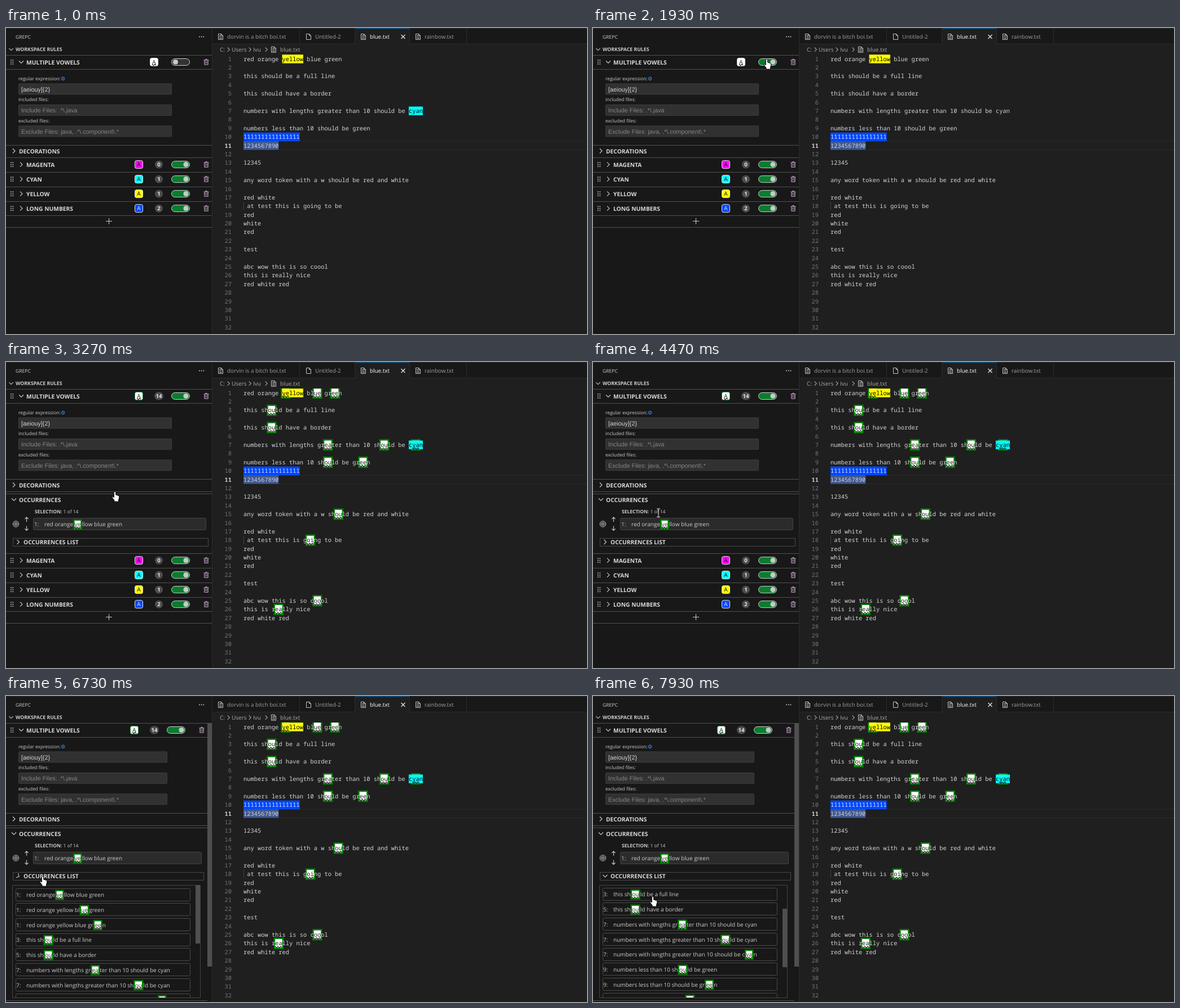
An HTML page with a canvas for the animation above (8 s loop, 1030 by 544 pixels).

```html
<!DOCTYPE html>
<html lang="en">
<head>
<meta charset="utf-8">
<title>Rule highlighter</title>
<style>
html, body { margin: 0; width: 100%; height: 100%; overflow: hidden; background: #1f1f1f; }
canvas { display: block; width: 1030px; height: 544px; }
</style>
</head>
<body>
<canvas id="stage" width="1030" height="544"></canvas>
<script>
const ctx = document.getElementById('stage').getContext('2d');
ctx.textRendering = 'geometricPrecision';

const LOOP = 8000, FPS = 15;
const UI = '"Open Sans", "Noto Sans", sans-serif';
const MONO = '"Noto Sans Mono", "DejaVu Sans Mono", monospace';
const ARIAL = '"Liberation Sans", Arial, sans-serif';
const FG = '#cccccc', RULE = '#505050', GREEN = '#008000';
const CODE_X = 421, CHAR_W = 6.235, LINE_H = 15.39, EDGE = 2.43;

const code = [
  'red orange yellow blue green', '', 'this should be a full line', '',
  'this should have a border', '',
  'numbers with lengths greater than 10 should be cyan', '',
  'numbers less than 10 should be green', '1111111111111111', '1234567890', '',
  '12345', '', 'any word token with a w should be red and white', '',
  'red white', ' at test this is going to be', 'red', 'white', 'red', '',
  'test', '', 'abc wow this is so coool', 'this is really nice', 'red white red'
];

// Every pair of vowels: line index, column, text
const hits = code.flatMap((text, line) =>
  [...text.matchAll(/[aeiouy]{2}/g)].map(m => ({ line, col: m.index, text })));

const words = [
  { line: 0, word: 'yellow', fill: '#ffff00', ink: '#000' },
  { line: 6, word: 'cyan', fill: '#00ffff', ink: '#000' },
  { line: 9, word: code[9], fill: '#0048ff', ink: '#dfe6ff' },
  { line: 10, word: code[10], fill: '#41588c', ink: '#cfd4e0' }
];

const rules = [
  ['MAGENTA', '#ff00ff', '#000', '0'], ['CYAN', '#00ffff', '#000', '1'],
  ['YELLOW', '#ffff00', '#000', '1'], ['LONG NUMBERS', '#0048ff', '#dfe6ff', '2']
];

// Pointer path: step, x, y
const path = [
  [0, 1060, 530], [2, 1060, 530], [3, 1024, 530], [4, 640, 300], [5, 245, 67],
  [8, 245, 67], [11, 262, 69], [14, 316, 60], [16, 308, 55], [30, 308, 55],
  [33, 400, 100], [37, 523, 157], [43, 523, 157], [46, 330, 190], [49, 193, 230],
  [51, 160, 234], [55, 123, 229], [56, 123, 229], [59, 121, 222], [60, 121, 222],
  [62, 118, 216], [67, 116, 268], [75, 116, 268], [76, 117, 262], [82, 65, 320],
  [107, 65, 320], [109, 101, 365], [110, 106, 356]
];
const hand = new Path2D('M-1.7 1.6Q0-1.2 1.7 1.6V6L6.6 7.6Q8 8.3 7.8 11L6.6 15V18.2H-1V16L-4.8 11Q-5.4 9-3.5 9.2L-1.7 11Z');

const clamp = v => Math.max(0, Math.min(1, v));
const ease = v => (v = clamp(v), v * v * (3 - 2 * v));

function rect(x, y, w, h, color) {
  ctx.fillStyle = color;
  ctx.fillRect(x, y, w, h);
}

function box(x, y, w, h, r, fill, stroke) {
  ctx.beginPath();
  ctx.roundRect(x + .5, y + .5, w - 1, h - 1, r);
  if (fill) { ctx.fillStyle = fill; ctx.fill(); }
  if (stroke) { ctx.strokeStyle = stroke; ctx.lineWidth = 1; ctx.stroke(); }
}

function clipTo(x, y, w, h, paint) {
  ctx.save();
  ctx.beginPath();
  ctx.rect(x, y, w, h);
  ctx.clip();
  paint();
  ctx.restore();
}

function disc(x, y, r, fill) {
  ctx.beginPath();
  ctx.arc(x, y, r, 0, 7);
  ctx.fillStyle = fill;
  ctx.fill();
}

// Text centred vertically on y; returns its width
function text(s, x, y, size, color = FG, opt = {}) {
  ctx.font = `${opt.bold ? 'bold ' : ''}${size}px ${opt.font || UI}`;
  ctx.textAlign = opt.align || 'left';
  ctx.fillStyle = color;
  ctx.fillText(s, x, y + size * .355);
  return ctx.measureText(s).width;
}

const title = (s, x, y) => text(s, x, y, 10.25, '#d8d8d8', { bold: true });

function stroke(points, color = FG, width = 1.1) {
  ctx.beginPath();
  points.forEach(([x, y], i) => i ? ctx.lineTo(x, y) : ctx.moveTo(x, y));
  ctx.strokeStyle = color;
  ctx.lineWidth = width;
  ctx.stroke();
}

function chevron(x, y, turn = 0, s = 1, color = FG) {
  ctx.save();
  ctx.translate(x, y);
  ctx.rotate(turn * Math.PI / 2);
  stroke([[-2 * s, -4 * s], [2 * s, 0], [-2 * s, 4 * s]], color);
  ctx.restore();
}

function wave(x, y, w) {
  const pts = [];
  for (let i = 0; i <= w; i += .5) pts.push([x + i, y - Math.cos(i * Math.PI / 2.5) * 1.2]);
  stroke(pts, '#111', 1.1);
}

function fileIcon(x, y, lined) {
  const c = '#c5c5c5';
  stroke([[x + 5.5, y - 5], [x + .5, y - 5], [x + .5, y + 5], [x + 8.5, y + 5], [x + 8.5, y - 2], [x + 5.5, y - 5], [x + 5.5, y - 2], [x + 8.5, y - 2]], c, 1);
  if (lined) for (const d of [-2, 0.5, 3]) rect(x + 2, y + d - .5, d < 0 ? 3 : 5, 1, c);
}

function trash(x, y) {
  const c = '#cfaad4';
  rect(x - 4.5, y - 4, 9, 1, c);
  rect(x - 1.5, y - 5.5, 3, 1.5, c);
  stroke([[x - 3.2, y - 3.5], [x - 3.2, y + 4.7], [x + 3.2, y + 4.7], [x + 3.2, y - 3.5]], c, 1);
  for (const d of [-1.2, 1.2]) rect(x + d - .4, y - 2, .9, 5, c);
}

function grip(y) {
  for (const x of [8, 11.5]) for (const d of [-3.5, 0, 3.5]) rect(x, y + d - .8, 1.7, 1.7, '#c0c0c0');
}

function toggle(x, y, p) {
  box(x, y - 6.5, 33, 13, 6, p > .4 ? '#0a7d2e' : '#333333', '#d0d0d0');
  disc(x + 7.5 + 18.5 * p, y, 4.6, '#c8c8c8');
}

function badge(s, x, y) {
  const w = s.length > 1 ? 17 : 15;
  box(x - w / 2, y - 7.5, w, 15, 7, '#4d4d4d');
  text(s, x, y, 9.6, '#e8e8e8', { bold: true, align: 'center' });
}

function swatch(x, y, fill, ink, edge = '#e6e6e6') {
  box(x - 7.5, y - 7.5, 15, 15, 3, fill, edge);
  text('A', x, y, 10, ink, { align: 'center' });
}

function ruleRow([name, fill, ink, count], y, dx) {
  grip(y);
  chevron(27, y);
  title(name, 36, y + .5);
  swatch(235.5 + dx, y, fill, ink);
  badge(count, 271 + dx, y);
  toggle(293 + dx, y, 1);
  trash(355 + dx, y);
}

function field(label, y, value, color, dx) {
  const w = text(label, 22, y - 18.5, 8.4);
  box(22, y - 10, 272 + dx, 20, 1, '#313131', '#3c3c3c');
  text(value, 27, y + .3, 10.8, color, { font: ARIAL });
  return w;
}

// One occurrence as text, with its vowel pair framed
function snippet({ line, col, text: s }, x, y) {
  const size = 10.05;
  text(`${line + 1}:`, x - 18, y, size, '#b8c8b0');
  x += text(s.slice(0, col).trimEnd(), x, y, size);
  ctx.font = `${size}px ${UI}`;
  const pair = s.slice(col, col + 2), w = ctx.measureText(pair).width;
  rect(x, y - 9, w + EDGE * 2, 18, GREEN);
  rect(x + EDGE, y - 6.6, w, 13.2, '#fff');
  text(pair, x + EDGE, y, size, '#333');
  wave(x + EDGE, y + 5.8, w);
  text(s.slice(col + 2).trimStart(), x + w + EDGE * 2, y, size);
}

function occurrences(step, dx, open) {
  rect(0, 234, 365 + dx, 1, RULE);
  chevron(14, 244.5, 1);
  title('OCCURRENCES', 23, 245);
  const w = text('SELECTION:', 51, 266, 8.5, FG, { bold: true });
  text(' 1 of 14', 51 + w, 266, 8.5);

  ctx.strokeStyle = FG;
  ctx.lineWidth = 1;
  for (const r of [5.2, 2.9]) { ctx.beginPath(); ctx.arc(17.5, 288, r, 0, 7); ctx.stroke(); }
  disc(17.5, 288, 1.2, FG);
  for (const [y, d] of [[276, 1], [299.5, -1]]) {
    stroke([[36.5, y], [36.5, y + 8 * d]]);
    stroke([[33.5, y + 3 * d], [36.5, y], [39.5, y + 3 * d]]);
  }
  box(48, 277, 307 + dx, 22, 2, '#2b2b2b', '#444444');
  snippet(hits[0], 68, 288.7);

  box(12, 313, 347 + dx, 15, 0, null, '#4a4a4a');
  chevron(21.5, 320, open ? Math.min(1, .28 + (step - 101) * .36) : 0);
  title('OCCURRENCES LIST', 31, 320.5);
}

function list(scroll) {
  box(11, 336, 334, 201, 0, null, '#444444');
  clipTo(12, 337, 324, 199, () => hits.forEach((hit, i) => {
    const y = 353.5 + i * 26.73 - scroll;
    if (y > 560 || y < 320) return;
    box(17, Math.round(y - 12), 310, 23, 2, null, '#4a4a4a');
    snippet(hit, 36, y + .2);
  }));
  rect(336, 336 + scroll * .52, 8, 104, '#4f4f4f');
}

function sidebar(step, ms) {
  const on = ease((step - 24) / 4), shown = step >= 30, open = step >= 101;
  const dx = open ? -8 : 0, right = 365 + dx;
  rect(0, 0, 365, 544, '#181818');
  rect(365, 0, 1, 544, '#2b2b2b');
  text('GREPC', 17, 15.5, 8.6);
  for (const x of [343, 346.7, 350.4]) disc(x, 15.5, .95, FG);
  chevron(9, 38, 1, .9);
  text('WORKSPACE RULES', 17, 38, 8.75, FG, { bold: true });

  rect(0, 48, right, 1, RULE);
  grip(60.5);
  chevron(27, 60.5, 1);
  title('MULTIPLE VOWELS', 36, 61);
  const sx = (shown ? 235.5 : 262.5) + dx;
  swatch(sx, 60.5, '#ffffff', '#222', shown ? '#1c9a3c' : '#dddddd');
  wave(sx - 3.5, 65.5, 7);
  if (shown) badge('14', 271 + dx, 60.5);
  toggle(293 + dx, 60.5, on);
  trash(355 + dx, 60.5);
  rect(0, 73, right, 1, RULE);

  const w = field('regular expression:', 108.5, '[aeiouy]{2}', '#d4d4d4', dx);
  ctx.beginPath();
  ctx.arc(22 + w + 4.5, 90, 2.8, 0, 7);
  ctx.strokeStyle = '#3794ff';
  ctx.lineWidth = 1;
  ctx.stroke();
  rect(22 + w + 4, 88.5, 1, 3, '#3794ff');
  field('included files:', 146, 'Include Files: .*\\.java', '#858585', dx);
  field('excluded files:', 183.5, 'Exclude Files: java, .*\\.component\\.*', '#858585', dx);

  rect(0, 208, right, 1, RULE);
  chevron(14, 218.5);
  title('DECORATIONS', 23, 219);
  rect(0, 230, right, 1, RULE);
  if (shown) occurrences(step, dx, open);

  if (open) {
    list(81 * ease((ms - 7425) / 510));
    rect(0, 541, right, 1, RULE);
    rect(357, 48, 8, 433, '#4f4f4f');
    return;
  }
  const top = shown ? 340 : 230;
  rules.forEach((rule, i) => {
    rect(0, top + i * 26, right, 1, RULE);
    ruleRow(rule, top + 12.7 + i * 26, dx);
  });
  rect(0, top + 103, right, 1, RULE);
  rect(177, top + 113, 11, 1, FG);
  rect(182, top + 108, 1, 11, FG);
  rect(0, top + 124, right, 1, RULE);
}

function tabs() {
  rect(366, 0, 664, 28, '#181818');
  rect(366, 28, 664, 1, '#2b2b2b');
  rect(619, 0, 96, 29, '#1f1f1f');
  const items = [['dorvin is a bitch boi.txt', 376, 520], ['Untitled-2', 532, 618],
    ['blue.txt', 629, 715], ['rainbow.txt', 726, 816]];
  items.forEach(([name, x, end], i) => {
    fileIcon(x, 15.5, i !== 1);
    text(name, x + 16, 15.7, 9.9, i === 2 ? '#ffffff' : '#9d9d9d');
    rect(end, 0, 1, 28, '#2b2b2b');
  });
  rect(619, .5, 96, .81, '#0078d4');
  for (const d of [-1, 1]) stroke([[700.5, 15.5 - 3.5 * d], [707.5, 15.5 + 3.5 * d]], '#e8e8e8', 1.2);

  [['C:', 379], ['Users', 400], ['Ivu', 438], ['blue.txt', 486]].forEach(([s, x]) => text(s, x, 38.3, 10, '#a9a9a9'));
  for (const x of [394.5, 432.5, 461.5]) chevron(x, 38.3, 0, .9, '#a9a9a9');
  fileIcon(470, 38.3, true);
}

function codeLines(step) {
  const marked = step >= 30;
  for (const y of [201, 216]) rect(CODE_X, y, 609, 1, '#2b2b2b');
  rect(CODE_X, 309, 1, 15, '#404040');

  const mid = line => 55 + line * LINE_H;
  const spans = words.filter(({ word }) => word !== 'cyan' || step < 28 || marked);
  const pairW = CHAR_W * 2;
  if (marked) for (const { line, col } of hits) {
    const x = CODE_X + col * CHAR_W, y = mid(line) - LINE_H / 2;
    rect(x - EDGE, y - EDGE, pairW + EDGE * 2, LINE_H + EDGE * 2, GREEN);
    rect(x, y, pairW, LINE_H, '#fff');
  }
  for (const { line, word, fill } of spans) {
    rect(CODE_X + code[line].indexOf(word) * CHAR_W, mid(line) - LINE_H / 2, word.length * CHAR_W, LINE_H, fill);
  }
  if (marked) for (const { line, col } of hits) wave(CODE_X + col * CHAR_W, mid(line) + 6.6, pairW);

  for (let line = 0; line < 32; line++) {
    const y = mid(line), active = line === 10;
    text(line + 1, 400, y, 10.39, active ? '#cccccc' : '#6e7681', { font: MONO, align: 'right', bold: active });
    const span = spans.find(s => s.line === line);
    const start = span ? code[line].indexOf(span.word) : 0;
    [...(code[line] || '')].forEach((ch, i) => {
      const hit = marked && hits.some(h => h.line === line && i >= h.col && i < h.col + 2);
      const inside = span && i >= start && i < start + span.word.length;
      const ink = inside ? span.ink : hit ? '#222' : '#d4d4d4';
      text(ch, CODE_X + i * CHAR_W, y, 10.39, ink, { font: MONO });
    });
  }
}

function editor(step) {
  rect(366, 0, 664, 544, '#1f1f1f');
  tabs();
  clipTo(366, 47, 664, 497, () => codeLines(step));
}

function pointer(step) {
  let i = path.findIndex(k => k[0] >= step);
  if (i < 0) i = path.length - 1;
  const b = path[i], a = path[Math.max(0, i - 1)];
  const p = clamp((step - a[0]) / (b[0] - a[0] || 1));
  const x = a[1] + (b[1] - a[1]) * p, y = a[2] + (b[2] - a[2]) * p;
  const overText = x > 366 || (step > 60 && x > 100 && y > 258 && y < 277);
  ctx.save();
  ctx.translate(x, y);
  if (overText) {
    stroke([[0, -7], [0, 7.5]], '#f0f0f0', 1);
    for (const d of [-7, 7.5]) stroke([[-3, d], [3, d]], '#f0f0f0', 1);
  } else {
    ctx.fillStyle = '#fff';
    ctx.strokeStyle = '#000';
    ctx.lineWidth = 1;
    ctx.fill(hand);
    ctx.stroke(hand);
  }
  ctx.restore();
}

function draw(now) {
  const step = Math.floor((now % LOOP) * FPS / 1000 + .07);
  editor(step);
  sidebar(step, step * 1000 / FPS);
  rect(0, 0, 619, 1, '#2b2b2b');
  rect(715, 0, 315, 1, '#2b2b2b');
  pointer(step);
}

let begin;
function tick(now) {
  begin ??= now;
  draw(now - begin);
  requestAnimationFrame(tick);
}
requestAnimationFrame(tick);
</script>
</body>
</html>
```
